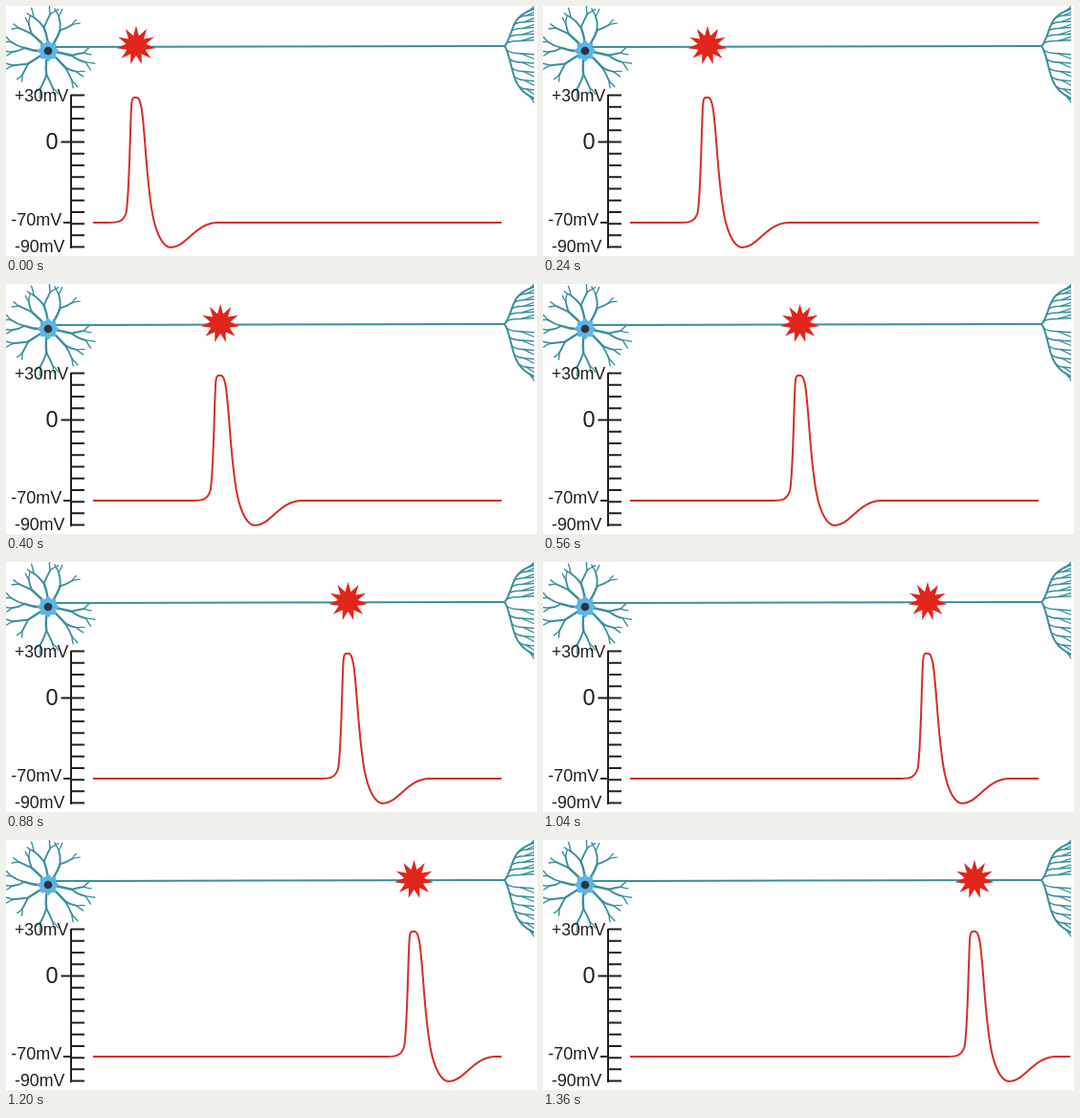
Write an HTML page that moves like this. It is 555 px wide and 262 px high and loops after 1520 ms.

```html
<!DOCTYPE html>
<html lang="en">
<head>
<meta charset="utf-8">
<title>Action potential along an axon</title>
<style>
html, body { margin: 0; width: 100%; height: 100%; overflow: hidden; background: #fff; }
svg { display: block; width: 555px; height: 262px; }
text { font: 18px "Liberation Sans", Arial, sans-serif; fill: #231f20; }
.nerve { fill: none; stroke: #3a909b; stroke-linecap: round; stroke-linejoin: round; }
.axis { fill: none; stroke: #231f20; stroke-width: 2; }
.signal { fill: none; stroke: #d42e2a; stroke-width: 2; stroke-linejoin: round; }
</style>
</head>
<body>
<svg viewBox="0 0 555 262">
  <defs><clipPath id="edge"><rect width="552" height="262"/></clipPath></defs>
  <g class="nerve" id="nerve" clip-path="url(#edge)">
    <path d="M44 43L521 42" stroke-width="2"/>
  </g>
  <polygon id="soma" fill="#5bb5e8" stroke="#5bb5e8" stroke-width="3" stroke-linejoin="round"/>
  <circle cx="44" cy="47" r="4.3" fill="#30343b"/>

  <path class="axis" id="scale"/>
  <text x="9" y="100" style="font-size:17.6px">+30mV</text>
  <text x="41.5" y="149.5" style="font-size:23.5px">0</text>
  <text x="5.3" y="229.5">-70mV</text>
  <text x="9" y="258" style="font-size:17.8px">-90mV</text>

  <path class="signal" id="signal"/>
  <polygon id="star" fill="#e1251b"/>
</svg>
<script>
const byId = id => document.getElementById(id);
const star = byId("star"), signal = byId("signal");
const lerp = (a, b, t) => a + (b - a) * t;

let seed = 11;
const random = () => (seed = seed * 16807 % 2147483647) / 2147483647;
const jitter = amount => (random() * 2 - 1) * amount;

function addNerve(d, width) {
  const path = document.createElementNS("http://www.w3.org/2000/svg", "path");
  path.setAttribute("d", d);
  path.setAttribute("stroke-width", width);
  byId("nerve").append(path);
}

function spikyPoints(count, outer, inner, cx = 0, cy = 0) {
  return Array.from({ length: count * 2 }, (_, i) => {
    const radius = i % 2 ? inner : outer, angle = i * Math.PI / count;
    return `${cx + radius * Math.sin(angle)},${cy - radius * Math.cos(angle)}`;
  }).join(" ");
}

// Each dendrite bends a little and forks until its twigs end
function growDendrite(x, y, angle, length, depth) {
  const bend = angle + jitter(0.25);
  const midX = x + Math.cos(bend) * length / 2, midY = y + Math.sin(bend) * length / 2;
  const endX = x + Math.cos(angle) * length, endY = y + Math.sin(angle) * length;
  addNerve(`M${x} ${y}Q${midX} ${midY} ${endX} ${endY}`, 1.4 + depth * 0.5);
  if (!depth) return;
  for (const side of [-1, 1])
    growDendrite(endX, endY, angle + side * 0.42 + jitter(0.2), length * (0.56 + jitter(0.1)), depth - 1);
}
for (const degrees of [-173, -134, -100, -60, 11, 44, 94, 147])
  growDendrite(44, 47, degrees * Math.PI / 180, 25, 2);

// The terminal fans out above (negative height) and below the axon
function growTerminal(height) {
  const trunk = t => [521 + 14 * t ** 0.7 + 17 * t ** 6, 42 + height * t];
  const steps = Array.from({ length: 21 }, (_, i) => trunk(i / 20).join(" "));
  addNerve(`M${steps.join("L")}`, 2);
  for (let t = 0.08; t < 0.95; t += 0.17) {
    const [x, y] = trunk(t);
    const forkX = lerp(x, 552, 0.5), forkY = y + height * 0.06;
    addNerve(`M${x} ${y}Q${x + 5} ${forkY} ${forkX} ${forkY}L553 ${forkY + height * 0.02}`, 1.5);
    addNerve(`M${forkX} ${forkY}L553 ${forkY + height * 0.11}`, 1.3);
  }
}
growTerminal(-39);
growTerminal(55);

byId("soma").setAttribute("points", spikyPoints(8, 9.5, 7, 44, 47));
star.setAttribute("points", spikyPoints(11, 20.5, 10.5));

const ticks = Array.from({ length: 14 }, (_, i) => `M68 ${93.6 + 12.23 * i}H82`).join("");
byId("scale").setAttribute("d", `M68 93V254${ticks}M57.5 142.5H68M60 227H68`);

// Impulse position by step: steady travel, slower at both ends
const stops = [[0, 136], [1, 172], [2, 224], [6, 402], [8, 451]];
const firstHold = 240, hold = 160, steps = 9;
const loop = firstHold + hold * (steps - 1);
const rest = 227, lineStart = 91, lineEnd = 518, stageEnd = 551;

function positionAt(step) {
  const next = Math.max(1, stops.findIndex(([at]) => at >= step));
  const [[fromStep, from], [toStep, to]] = stops.slice(next - 1, next + 1);
  return lerp(from, to, (step - fromStep) / (toStep - fromStep));
}

// Rise, rounded peak, fall, undershoot and recovery, relative to the spike
const spike = "c10 0 15-1 18-10c3.5-16 4-89 5.7-114c.6-7 1.8-7.2 4.3-7.2" +
  "c3 0 4 1.2 6 10.2c4 24 5 78 12 114c4 20 11 33 19 33c16 0 25-26 49-26";

function draw(now) {
  const t = now % loop;
  const step = t < firstHold ? 0 : 1 + Math.floor((t - firstHold) / hold);
  const x = positionAt(step);
  const end = x + 86 > lineEnd ? stageEnd : lineEnd;
  star.setAttribute("transform", `translate(${x} 41.3)`);
  signal.setAttribute("d", `M${lineStart} ${rest}H${x - 28.5}${spike}H${end}`);
  requestAnimationFrame(draw);
}
draw(performance.now());
</script>
</body>
</html>
```
